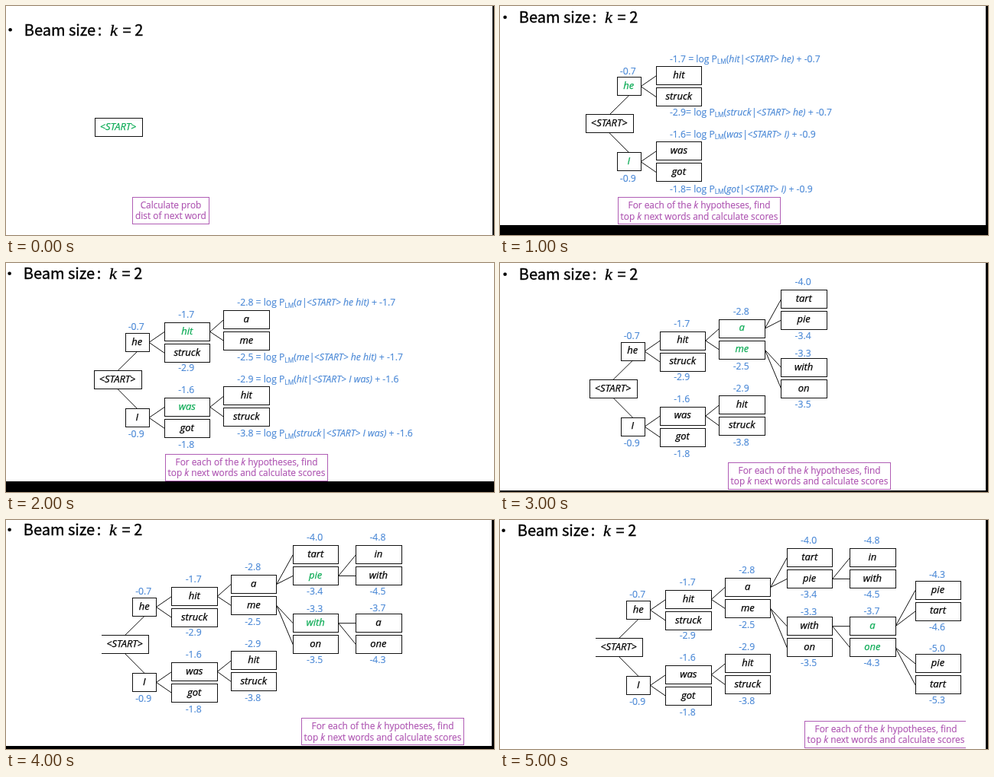
Recreate the animation shown at these times as an HTML page. Size 638 by 301 pixels, loop 6000 ms.

```html
<!DOCTYPE html>
<html lang="en">
<head>
<meta charset="utf-8">
<title>Beam search</title>
<style>
  html, body { margin: 0; width: 100%; height: 100%; overflow: hidden; background: #fff; }
  svg { display: block; width: 638px; height: 301px; }
  text { font-family: "Open Sans", "Noto Sans", sans-serif; white-space: pre; }
  .title { font: 20px "Noto Sans CJK KR", "Noto Sans CJK JP", "Noto Sans CJK SC", "Noto Sans", sans-serif; stroke: #000; stroke-width: 0.35; }
  .title .k { font: italic 22px "Liberation Serif", serif; }
  .line { fill: none; stroke: #111; stroke-width: 1; }
  .box, .frame { shape-rendering: crispEdges; }
  .word { font-size: 13px; font-style: italic; text-anchor: middle; stroke: #000; stroke-width: 0.25; }
  .hot { fill: #0dab56; stroke: #0dab56; }
  .score { font-size: 12.2px; fill: #4a88d6; stroke: #4a88d6; stroke-width: 0.15; }
  .mid { text-anchor: middle; }
  .sub { font-size: 8.3px; }
  .it { font-style: italic; }
  .note { font-size: 11.85px; fill: #ad53b1; text-anchor: middle; stroke: #ad53b1; stroke-width: 0.15; }
  .frame { fill: none; stroke: #b05db5; stroke-width: 1; }
</style>
</head>
<body>
<svg id="stage" viewBox="0 0 638 301"></svg>
<script>
const stage = document.getElementById('stage');
const BOX_H = 24;

// Tree nodes, each with its box corner, its score and the score's centre line
const nodes = {};
function add(id, word, parent, x, y, score, scoreY, w = 59.5) {
  const depth = parent ? nodes[parent].depth + 1 : 0;
  nodes[id] = { word, parent: nodes[parent], x, y, w, score, scoreY, depth };
}
add('start', '<START>', null, 124.5, 151.2, '', 0, 62);
add('he', 'he', 'start', 165.5, 102, '-0.7', 94, 31);
add('I', 'I', 'start', 165.5, 201, '-0.9', 235, 31);
add('hit', 'hit', 'he', 216.8, 88, '-1.7', 78);
add('struck', 'struck', 'he', 216.8, 116, '-2.9', 148);
add('was', 'was', 'I', 216.8, 187, '-1.6', 177);
add('got', 'got', 'I', 216.8, 215, '-1.8', 249);
add('a', 'a', 'hit', 294.3, 72, '-2.8', 62);
add('me', 'me', 'hit', 294.3, 100, '-2.5', 134);
add('hit2', 'hit', 'was', 294.3, 172.5, '-2.9', 163);
add('struck2', 'struck', 'was', 294.3, 200, '-3.8', 234);
add('tart', 'tart', 'a', 375.2, 33.3, '-4.0', 23);
add('pie', 'pie', 'a', 375.2, 61, '-3.4', 94);
add('with', 'with', 'me', 375.2, 123.3, '-3.3', 117);
add('on', 'on', 'me', 375.2, 151.3, '-3.5', 184);
add('in', 'in', 'pie', 457.5, 33.3, '-4.8', 22.5);
add('with2', 'with', 'pie', 457.5, 61, '-4.5', 94);
add('a2', 'a', 'with', 457.5, 123.3, '-3.7', 116);
add('one', 'one', 'with', 457.5, 151.3, '-4.3', 184);
add('pie2', 'pie', 'a2', 543, 76, '-4.3', 68);
add('tart2', 'tart', 'a2', 543, 103.6, '-4.6', 137);
add('pie3', 'pie', 'one', 543, 172.5, '-5.0', 165);
add('tart3', 'tart', 'one', 543, 200.5, '-5.3', 233);

const FIND = ['For each of the <tspan class="it">k</tspan> hypotheses, find',
              'top <tspan class="it">k</tspan> next words and calculate scores'];
const CALCULATE = ['Calculate prob', 'dist of next word'];

// depth: deepest tree level shown; right/bottom: where the black margins begin
const scenes = [
  { depth: 0, dx: -8.5, dy: -3.6, title: [24, 38.5], hot: ['start'], note: [165.5, 251.4, 100], lines: CALCULATE, right: 636 },
  { depth: 2, dx: -12.4, dy: -8.3, title: [25, 22], hot: ['he', 'I'], note: [154.5, 251.5, 212], right: 635, bottom: 288, formulas: true },
  { depth: 3, dx: -9.5, dy: -9.6, title: [23, 21], hot: ['hit', 'was'], note: [208.5, 251.4, 212], bottom: 287, formulas: true },
  { depth: 4, dx: -7.5, dy: 2.1, title: [25, 22], hot: ['a', 'me'], note: [298.5, 262.4, 212], right: 635, bottom: 299 },
  { depth: 5, dx: 0, dy: 0.4, title: [23, 20], hot: ['pie', 'with'], note: [386.5, 260.5, 212], right: 635, bottom: 297, openStart: true },
  { depth: 6, dx: 0, dy: 4.4, title: [23, 21], hot: ['a2', 'one'], note: [398.5, 264.4, 212], right: 635, openStart: true, openNote: true },
];

const escapeText = s => s.replace(/</g, '&lt;').replace(/>/g, '&gt;');
const text = (cls, x, y, body) => `<text class="${cls}" x="${x}" y="${y}">${body}</text>`;
const path = (cls, d) => `<path class="${cls}" d="${d}"/>`;
const black = (x, y, w, h) => `<rect x="${x}" y="${y}" width="${w}" height="${h}"/>`;

function history(node) {
  return node.parent ? history(node.parent) + ' ' + node.word : node.word;
}

function edge({ parent: p, x, y, w, depth }) {
  if (depth > 1) return path('line', `M${p.x + p.w} ${p.y + BOX_H / 2}L${x} ${y + BOX_H / 2}`);
  const up = y < p.y;
  return path('line', `M${p.x + p.w / 2} ${up ? p.y : p.y + BOX_H}L${x + w / 2} ${up ? y + BOX_H : y}`);
}

function formula(node) {
  const gap = node.depth === 2 && node.word !== 'hit' ? '' : ' ';
  const given = escapeText(`${node.word}|${history(node.parent)})`);
  return `${node.score}${gap}= log P<tspan class="sub" dy="2.5">LM</tspan>` +
    `<tspan dy="-2.5">(</tspan><tspan class="it">${given}</tspan> + ${node.parent.score}`;
}

function drawNode(id, scene) {
  const node = nodes[id], { word, x, y, w, score, scoreY, depth } = node;
  const open = depth === 0 && scene.openStart;
  let out = path('line box', `M${x} ${y}h${w}v${BOX_H}h${-w}${open ? '' : 'z'}`);
  out += text(scene.hot.includes(id) ? 'word hot' : 'word', x + w / 2 - 0.3, y + BOX_H / 2 + 3.4, escapeText(word));
  if (node.parent) {
    out += edge(node);
    out += scene.formulas && depth === scene.depth
      ? text('score', x + 17.5, scoreY + 3.9, formula(node))
      : text('score mid', x + w / 2 - 1.3, scoreY + 3.9, score);
  }
  return out;
}

function drawTitle([x, y]) {
  return `<circle cx="${x - 18.4}" cy="${y - 7.3}" r="2.3"/>` + text('title', x - 0.2, y,
    `Beam size<tspan x="${x + 95.8}">:</tspan><tspan class="k" x="${x + 112}">k</tspan><tspan x="${x + 128.6}">= 2</tspan>`);
}

function drawNote({ note: [x, y, w], lines = FIND, openNote }) {
  const frame = openNote ? `M609 ${y}H${x}v35H609` : `M${x} ${y}h${w}v35h${-w}z`;
  return path('frame', frame) +
    lines.map((line, i) => text('note', x + w / 2, y + 14.4 + i * 14.6, line)).join('');
}

function drawScene(scene) {
  const visible = Object.keys(nodes).filter(id => nodes[id].depth <= scene.depth);
  const { right = 638, bottom = 301 } = scene;
  return drawTitle(scene.title) +
    `<g transform="translate(${scene.dx} ${scene.dy})">${visible.map(id => drawNode(id, scene)).join('')}</g>` +
    drawNote(scene) + black(right, 0, 638 - right, 301) + black(0, bottom, 638, 301 - bottom);
}

let shown = -1;
function tick() {
  const index = Math.floor(performance.now() / 1000) % scenes.length;
  if (index !== shown) stage.innerHTML = drawScene(scenes[shown = index]);
  requestAnimationFrame(tick);
}
tick();
</script>
</body>
</html>
```
